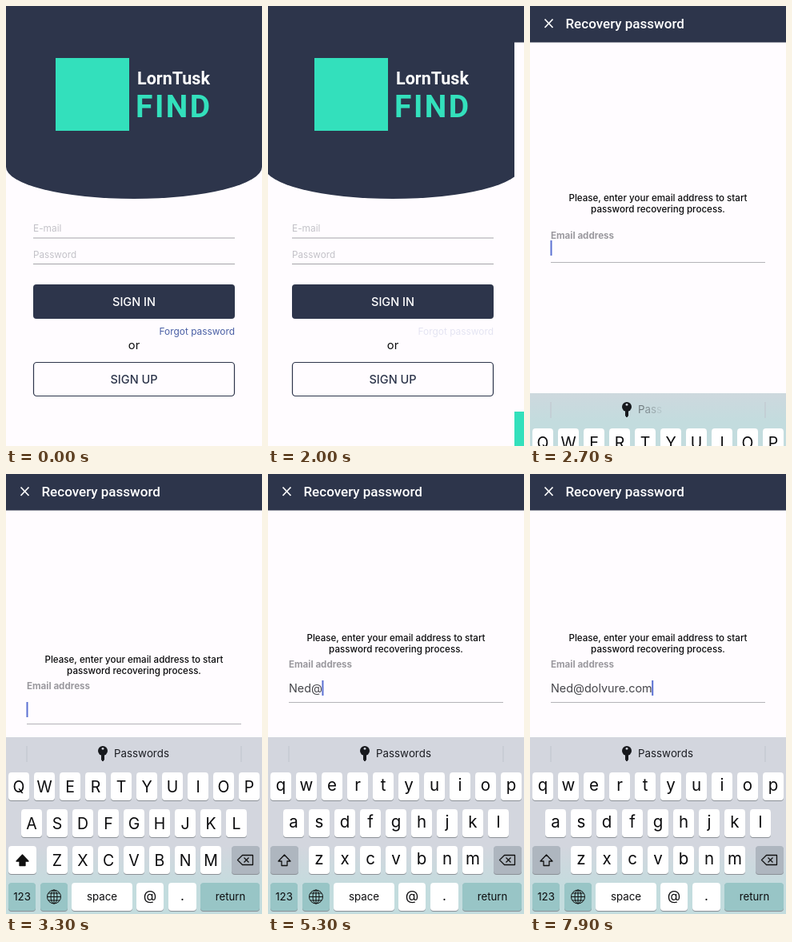
Write an HTML page with a canvas that moves like this. It is 320x550 px and loops after 8000 ms.

```html
<!DOCTYPE html>
<html lang="en">
<head>
<meta charset="utf-8">
<title>Password recovery</title>
<style>
html, body { margin: 0; width: 100%; height: 100%; overflow: hidden; background: #fffcff; }
canvas { display: block; width: 320px; height: 550px; }
</style>
</head>
<body>
<canvas id="stage" width="320" height="550"></canvas>
<script>
const ctx = document.getElementById('stage').getContext('2d');
const LOOP = 8000, W = 320, H = 550;
const PAPER = '#fffcff', NAVY = '#2d354b', TEAL = '#33e0bc', INK = '#0c0c0e';
const SANS = 'Inter, sans-serif', ROBOTO = 'Roboto, sans-serif';

const EMAIL = 'Ned@dolvure.com';
const PRESS_TIMES = [4300, 4580, 4800, 5080, 5480, 5720, 5960, 6200, 6430, 6640, 6930, 7150, 7340, 7520, 7690];
const POPUP_MS = 140;

const clamp = v => Math.max(0, Math.min(1, v));
const progress = (t, start, duration) => clamp((t - start) / duration);
const easeInOut = p => p < 0.5 ? 4 * p ** 3 : 1 - 4 * (1 - p) ** 3;
const easeOut = p => 1 - (1 - p) ** 3;

function rect(x, y, w, h, color) {
  ctx.fillStyle = color;
  ctx.fillRect(x, y, w, h);
}

function roundRect(x, y, w, h, r, color) {
  ctx.fillStyle = color;
  ctx.beginPath();
  ctx.roundRect(x, y, w, h, r);
  ctx.fill();
}

function text(str, x, y, size, { color = INK, weight = 400, align = 'left', font = SANS, spacing = 0 } = {}) {
  ctx.font = `${weight} ${size}px ${font}`;
  ctx.letterSpacing = spacing + 'px';
  ctx.textAlign = align;
  ctx.textBaseline = 'alphabetic';
  ctx.fillStyle = color;
  ctx.fillText(str, x, y);
}

const centered = (str, x, y, size, style) => text(str, x, y, size, { align: 'center', ...style });

function polyline(points, width, color, closed, filled) {
  ctx.beginPath();
  points.forEach(([x, y]) => ctx.lineTo(x, y));
  if (closed) ctx.closePath();
  ctx.lineWidth = width;
  ctx.strokeStyle = ctx.fillStyle = color;
  ctx.lineJoin = 'round';
  if (filled) ctx.fill();
  ctx.stroke();
}

function drawLogin(t) {
  rect(0, 0, W, H, PAPER);
  rect(0, 0, W, 201, NAVY);
  ctx.beginPath();
  ctx.ellipse(160, 201, 160, 40, 0, 0, Math.PI);
  ctx.fill();

  rect(62, 65, 92, 91, TEAL);
  text('LornTusk', 164, 98, 21.5, { color: '#fff', weight: 700, font: ROBOTO });
  text('FIND', 162, 139, 39, { color: TEAL, weight: 700, font: ROBOTO, spacing: 2.5 });

  text('E-mail', 34, 282, 11.9, { color: '#c3c2c8' });
  rect(34, 289.5, 252, 1, '#a5a5a9');
  text('Password', 34, 315, 11.7, { color: '#c3c2c8' });
  rect(34, 322, 252, 1, '#a5a5a9');

  roundRect(34, 348, 252, 43, 4, NAVY);
  centered('SIGN IN', 160, 375, 14.5, { color: '#fff', weight: 500 });

  ctx.globalAlpha = 1 - 0.85 * progress(t, 1750, 150);
  text('Forgot password', 286, 411, 11.9, { color: '#4a5fa5', align: 'right' });
  ctx.globalAlpha = 1;
  centered('or', 160, 429, 14.7);

  ctx.strokeStyle = NAVY;
  ctx.lineWidth = 1.2;
  ctx.beginPath();
  ctx.roundRect(34.5, 445.5, 251, 42, 4);
  ctx.stroke();
  centered('SIGN UP', 160, 472, 14.5, { color: NAVY, weight: 500 });
}

function drawRecovery(t, typed) {
  rect(0, 0, W, H, PAPER);
  rect(0, 507, W, 43, TEAL);
  rect(0, 0, W, 45.5, NAVY);
  polyline([[18.5, 16.5], [28.5, 27]], 1.7, '#fff');
  polyline([[28.5, 16.5], [18.5, 27]], 1.7, '#fff');
  text('Recovery password', 44.5, 28, 17, { color: '#fff', weight: 500, font: ROBOTO });

  const lineY = 320 - Math.round(35 * easeInOut(progress(t, 3150, 400)));
  const float = progress(t, 2600, 190);
  centered('Please, enter your email address to start', 160, lineY - 76.5, 11.6, { weight: 500 });
  centered('password recovering process.', 160, lineY - 62, 11.6, { weight: 500 });
  text('Email address', 26, lineY - 13 - 30 * float, 11.6, { color: '#9a999e', weight: 700 });
  rect(26, lineY, 268, 1, '#b4b3b8');

  text(typed, 26, lineY - 12, 14.4, { color: '#45454a' });
  const caretX = 26 + ctx.measureText(typed).width;
  if (t > 2600 && (t < 3500 || t > 3950)) rect(caretX - 0.5, lineY - 27, 2, 19, '#5b70d2');
}

function keyCap(x, y, w, color = '#fff') {
  roundRect(x, y + 1, w, 35, 4, '#8b9096');
  roundRect(x, y, w, 35, 4, color);
}

// Letter keys by center position; y is the top of the cap.
const letterKeys = [
  ...[...'qwertyuiop'].map((ch, i) => ({ ch, x: 16 + 32 * i, y: 373, w: 26 })),
  ...[...'asdfghjkl'].map((ch, i) => ({ ch, x: 32 + 32 * i, y: 419, w: 26 })),
  ...[...'zxcvbnm'].map((ch, i) => ({ ch, x: 64 + 32 * i, y: 465, w: 26 })),
  { ch: '@', x: 180, y: 511, w: 34 },
  { ch: '.', x: 220.5, y: 511, w: 35 },
];

function drawSuggestionBar(t) {
  rect(25.5, 340, 1, 20, '#c0c3cb');
  rect(293.5, 340, 1, 20, '#c0c3cb');
  ctx.fillStyle = '#17191d';
  ctx.beginPath();
  ctx.arc(121, 346, 6, 0, 7);
  ctx.fill();
  polyline([[119.5, 350], [122.5, 350], [122.5, 357], [121, 359], [119.5, 357]], 1, '#17191d', true, true);
  ctx.fillStyle = '#d3d6de';
  ctx.beginPath();
  ctx.arc(121, 343.3, 1.4, 0, 7);
  ctx.fill();

  let x = 135;
  [...'Passwords'].forEach((ch, i) => {
    ctx.globalAlpha = clamp((t - 2625 - i * 20) / 150);
    text(ch, x, 354, 13.3, { color: '#1b1d22' });
    x += ctx.measureText(ch).width;
  });
  ctx.globalAlpha = 1;
}

function drawShift(upper) {
  keyCap(3, 465, 35, upper ? '#fff' : '#aeb6bf');
  polyline([[20.5, 476], [28, 484], [24, 484], [24, 489.5], [17, 489.5], [17, 484], [13, 484]],
    1.3, '#111', true, upper);
}

function drawBackspace() {
  keyCap(282, 465, 35, '#aeb6bf');
  polyline([[289.5, 482.5], [295.5, 476.5], [308.5, 476.5], [308.5, 488.5], [295.5, 488.5]], 1.3, '#111', true);
  polyline([[297.5, 479.5], [303.5, 485.5]], 1.3, '#111');
  polyline([[303.5, 479.5], [297.5, 485.5]], 1.3, '#111');
}

function drawGlobe() {
  ctx.strokeStyle = '#111';
  ctx.lineWidth = 1;
  for (const rx of [8.5, 4]) {
    ctx.beginPath();
    ctx.ellipse(60, 528.5, rx, 8.5, 0, 0, 7);
    ctx.stroke();
  }
  polyline([[60, 520], [60, 537]], 1, '#111');
  polyline([[51.5, 528.5], [68.5, 528.5]], 1, '#111');
  polyline([[53, 524], [67, 524]], 1, '#111');
  polyline([[53, 533], [67, 533]], 1, '#111');
}

function drawPopup(char) {
  const { x, y, w } = letterKeys.find(key => key.ch === char.toLowerCase());
  const inner = w / 2, outer = inner + 11, top = y - 56;
  ctx.save();
  ctx.shadowColor = 'rgba(0, 0, 0, .35)';
  ctx.shadowBlur = 4;
  ctx.shadowOffsetY = 1;
  ctx.fillStyle = '#fefefe';
  ctx.beginPath();
  ctx.moveTo(x, top);
  ctx.arcTo(x + outer, top, x + outer, top + 20, 9);
  ctx.lineTo(x + outer, y - 18);
  ctx.bezierCurveTo(x + outer, y - 4, x + inner, y - 4, x + inner, y + 10);
  ctx.arcTo(x + inner, y + 35, x, y + 35, 4);
  ctx.arcTo(x - inner, y + 35, x - inner, y + 10, 4);
  ctx.lineTo(x - inner, y + 10);
  ctx.bezierCurveTo(x - inner, y - 4, x - outer, y - 4, x - outer, y - 18);
  ctx.arcTo(x - outer, top, x, top, 9);
  ctx.fill();
  ctx.restore();
  centered(char, x, y - 20, 31);
}

function drawKeyboard(t, count) {
  const offset = Math.round(221 * (1 - easeOut(progress(t, 2650, 455))));
  if (offset >= 221) return;

  // The teal button below shows through at a fixed place on the screen.
  const tint = ctx.createLinearGradient(0, 465, 0, 520);
  tint.addColorStop(0, '#d3d6de');
  tint.addColorStop(1, '#c3dcde');
  rect(0, 329 + offset, W, 221, tint);

  ctx.save();
  ctx.translate(0, offset);
  drawSuggestionBar(t);

  const upper = count === 0;
  for (const { ch, x, y, w } of letterKeys) {
    keyCap(x - w / 2, y, w);
    const small = y === 511;
    centered(upper ? ch.toUpperCase() : ch, x, y + (small ? 22 : upper ? 24.5 : 23), small ? 17 : upper ? 19.5 : 20.5);
  }
  drawShift(upper);
  drawBackspace();

  const TINTED = '#98c5c6';
  keyCap(3, 511, 34, TINTED);
  centered('123', 20, 533, 13.3);
  keyCap(43, 511, 34, TINTED);
  drawGlobe();
  keyCap(82, 511, 76);
  centered('space', 120, 533, 13.3);
  keyCap(243, 511, 74, TINTED);
  centered('return', 280.5, 533, 13.2);

  if (count && t - PRESS_TIMES[count - 1] < POPUP_MS) drawPopup(EMAIL[count - 1]);
  ctx.restore();
}

function draw(t) {
  const push = easeInOut(progress(t, 1890, 520));
  const count = PRESS_TIMES.filter(time => time <= t).length;

  if (push < 1) {
    ctx.save();
    ctx.translate(-Math.round(0.3 * W * push), 0);
    drawLogin(t);
    ctx.restore();
  }
  if (push > 0) {
    ctx.save();
    ctx.translate(Math.round(W * (1 - push)), 0);
    drawRecovery(t, EMAIL.slice(0, count));
    ctx.restore();
  }
  drawKeyboard(t, count);
}

const start = performance.now();
function tick() {
  draw((performance.now() - start) % LOOP);
  requestAnimationFrame(tick);
}
tick();
</script>
</body>
</html>
```
